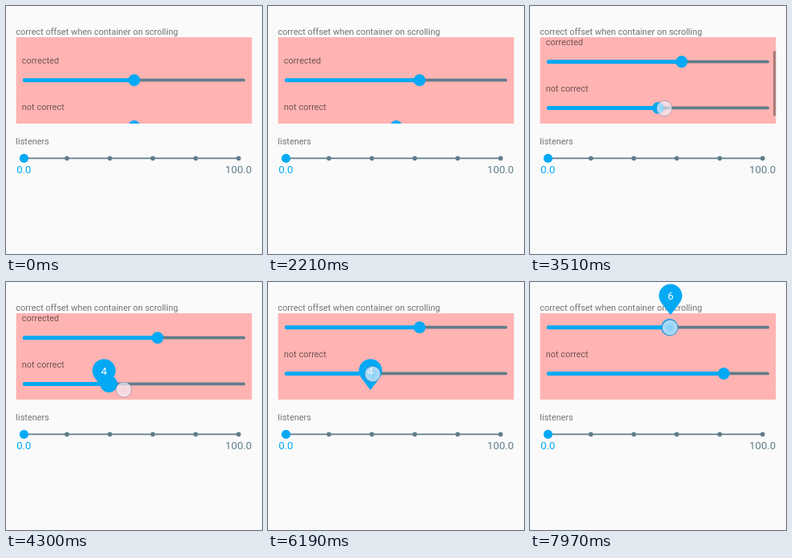
An HTML page with a canvas that plays this animation: 320x310 px, repeating every 8 s.

```html
<!DOCTYPE html>
<html lang="en">
<head>
<meta charset="utf-8">
<title>Slider offset demo</title>
<style>
html, body { margin: 0; width: 100%; height: 100%; overflow: hidden; background: #fafafa; }
canvas { display: block; width: 320px; height: 310px; }
</style>
</head>
<body>
<canvas id="stage"></canvas>
<script>
const LOOP = 8000, W = 320, H = 310;
const BLUE = '#03a9f4', GREY = '#607d8b', TEXT = 'rgba(0,0,0,.54)';
const BOX = { x: 12.4, y: 39, w: 295.2, h: 108 };
const ROW = [92.7, 150.4];          // slider heights before scrolling
const GRAB = 7.8;                   // finger to thumb distance
const THUMB_LAG = 30, BUBBLE_LAG = 48;
const FADE = 200, HOLD = 120;       // bubble fade, and its wait after release

const canvas = document.getElementById('stage');
const ctx = canvas.getContext('2d');
const dpr = window.devicePixelRatio || 1;
canvas.width = W * dpr;
canvas.height = H * dpr;

// Finger x over time for each drag, as [ms, x]
const drags = [
  { row: 0, from: 160, to: 1875, y: [98, 99.3],
    path: [[160, 168], [590, 168], [912, 125.5], [1310, 73], [1385, 73], [1720, 174], [1770, 180], [1865, 197.3]] },
  { row: 1, from: 3510, to: 4435, y: [128, 134.5],
    path: [[3510, 168], [3640, 168], [3945, 70.3], [4010, 70.3], [4252, 130], [4270, 136], [4300, 147], [4400, 175]] },
  { row: 1, from: 5840, to: 7055, y: [115, 115],
    path: [[5840, 175], [5930, 175], [6142, 136], [6160, 134.5], [6190, 130.8], [6280, 130.8], [6542, 160.5], [7020, 250]] },
  { row: 0, from: 7640, to: 8200, y: [57, 57],
    path: [[7640, 197.3], [7760, 197.3], [7922, 183.5], [7940, 182.5], [7970, 175]] }
];

const swipes = [
  { from: 2500, to: 3290, start: 2620, end: 3200, a: 0, b: 23, y: [117, 87] },
  { from: 5010, to: 5630, start: 5110, end: 5520, a: 23, b: 36, y: [117, 87] }
];

const clamp = (v, a = 0, b = 1) => Math.min(b, Math.max(a, v));
const ramp = (t, a, b) => clamp((t - a) / (b - a));
const smooth = u => u * u * (3 - 2 * u);
const mix = (a, b, u) => a + (b - a) * u;

// Monotone cubic through the path's points
function along(p, t) {
  const n = p.length - 1;
  if (t <= p[0][0]) return p[0][1];
  if (t >= p[n][0]) return p[n][1];
  let i = 0;
  while (t > p[i + 1][0]) i++;
  const slope = k => (p[k + 1][1] - p[k][1]) / (p[k + 1][0] - p[k][0]);
  const tangent = k => {
    if (k === 0 || k === n) return 0;
    const a = slope(k - 1), b = slope(k);
    return a * b > 0 ? 2 * a * b / (a + b) : 0;
  };
  const d = p[i + 1][0] - p[i][0], u = (t - p[i][0]) / d, s = smooth(u);
  return mix(p[i][1], p[i + 1][1], s)
    + d * (u * (1 - u) ** 2 * tangent(i) - u * u * (1 - u) * tangent(i + 1));
}

function disc(x, y, r, color) {
  ctx.fillStyle = color;
  ctx.beginPath();
  ctx.arc(x, y, r, 0, 7);
  ctx.fill();
}

function line(x1, x2, y, width, color) {
  ctx.strokeStyle = color;
  ctx.lineWidth = width;
  ctx.lineCap = 'round';
  ctx.beginPath();
  ctx.moveTo(x1, y);
  ctx.lineTo(x2, y);
  ctx.stroke();
}

function text(str, x, y, size = 10.97, color = TEXT, align = 'left') {
  ctx.font = size + 'px Roboto, sans-serif';
  ctx.textAlign = align;
  ctx.fillStyle = color;
  ctx.fillText(str, x, y);
}

function slider(x, y, r) {
  line(x, 297.2, y, 3.7, GREY);
  line(23.3, x, y, 5, BLUE);
  disc(x, y, r, BLUE);
}

function bubble(x, y, value, alpha) {
  const r = 14.5, side = r * Math.sqrt(3) / 2, k = 1.6;
  ctx.save();
  ctx.globalAlpha = alpha;
  ctx.translate(x, y);
  ctx.fillStyle = BLUE;
  ctx.beginPath();
  ctx.moveTo(0, r * 5 / 3);
  ctx.quadraticCurveTo(-side - k, r / 2 - k, -side, r / 2);
  ctx.arc(0, 0, r, Math.PI * 5 / 6, Math.PI * 13 / 6);
  ctx.quadraticCurveTo(side + k, r / 2 - k, 0, r * 5 / 3);
  ctx.fill();
  text(value, 0, 4.7, 13.3, '#fff', 'center');
  ctx.restore();
}

function finger(x, y, alpha) {
  const glow = ctx.createRadialGradient(x, y, 0, x, y, 9.6);
  glow.addColorStop(0, 'rgba(240,240,250,.55)');
  glow.addColorStop(1, 'rgba(240,240,250,.74)');
  ctx.save();
  ctx.globalAlpha = alpha;
  disc(x, y, 9.6, glow);
  ctx.strokeStyle = 'rgba(135,130,165,.55)';
  ctx.lineWidth = 1;
  ctx.stroke();
  ctx.restore();
}

function scrollState(t) {
  let pos = 0, bar = 0;
  for (const s of swipes) {
    if (t < s.start) continue;
    pos = mix(s.a, s.b, smooth(ramp(t, s.start, s.end)));
    bar = 1 - ramp(t, s.end + 330, s.end + 580);
  }
  return { pos, bar };
}

function listeners() {
  text('listeners', 12.3, 173);
  line(22.5, 291, 190.4, 1.7, GREY);
  for (let i = 1; i < 6; i++) disc(22.5 + i * 53.65, 190.4, 2.8, GREY);
  disc(22.5, 190.4, 5.6, BLUE);
  text('0.0', 13.2, 209.3, 13.2, BLUE);
  text('100.0', 307.2, 209.3, 13.2, GREY, 'right');
}

function draw(t) {
  ctx.setTransform(dpr, 0, 0, dpr, 0, 0);
  ctx.fillStyle = '#fafafa';
  ctx.fillRect(0, 0, W, H);
  text('correct offset when container on scrolling', 12.3, 36);
  listeners();

  const { pos, bar } = scrollState(t);
  const x = [160.2, 160.2], r = [7.4, 7.4];
  let active = null, shown = 0;
  for (const d of drags) {
    if (t < d.from) continue;
    const out = d.to + HOLD;
    x[d.row] = along(d.path, t - THUMB_LAG) - GRAB;
    r[d.row] = t >= d.from + 30 && t < out + FADE ? 10.7 : 7.4;
    shown = ramp(t, d.from + 30, d.from + 30 + FADE) * (1 - ramp(t, out, out + FADE));
    active = d;
  }

  ctx.save();
  ctx.beginPath();
  ctx.rect(BOX.x, BOX.y, BOX.w, BOX.h);
  ctx.clip();
  ctx.fillStyle = '#ffb3b3';
  ctx.fillRect(BOX.x, BOX.y, BOX.w, BOX.h);
  text('corrected', 19.8, 72.4 - pos);
  text('not correct', 19.8, 130.3 - pos);
  ROW.forEach((y, i) => slider(x[i], y - pos, r[i]));
  if (bar > 0) {
    ctx.fillStyle = `rgba(0,0,0,${0.32 * bar})`;
    ctx.fillRect(304, BOX.y + pos * 0.75, 3.6, 81);
  }
  ctx.restore();

  if (active) {
    const d = active;
    if (shown > 0) {
      const bx = along(d.path, t - BUBBLE_LAG) - GRAB;
      // The second slider's bubble ignores the scroll position
      const by = ROW[d.row] - 39.6 - (d.row ? 0 : pos);
      bubble(bx, by, Math.round((bx - 21) / 27.8 - 0.06), shown);
    }
    if (t < d.to) {
      const fy = mix(d.y[0], d.y[1], smooth(ramp(t, d.from + 100, d.from + 780)));
      finger(along(d.path, t), fy, 1);
    }
  }
  for (const s of swipes) {
    if (t < s.from || t >= s.to + 30) continue;
    const u = smooth(ramp(t, s.from + 50, s.end));
    finger(241, mix(s.y[0], s.y[1], u), 1 - ramp(t, s.to, s.to + 30));
  }
}

const begin = performance.now();
function frame() {
  draw((performance.now() - begin) % LOOP);
  requestAnimationFrame(frame);
}
draw(0);
requestAnimationFrame(frame);
</script>
</body>
</html>
```
